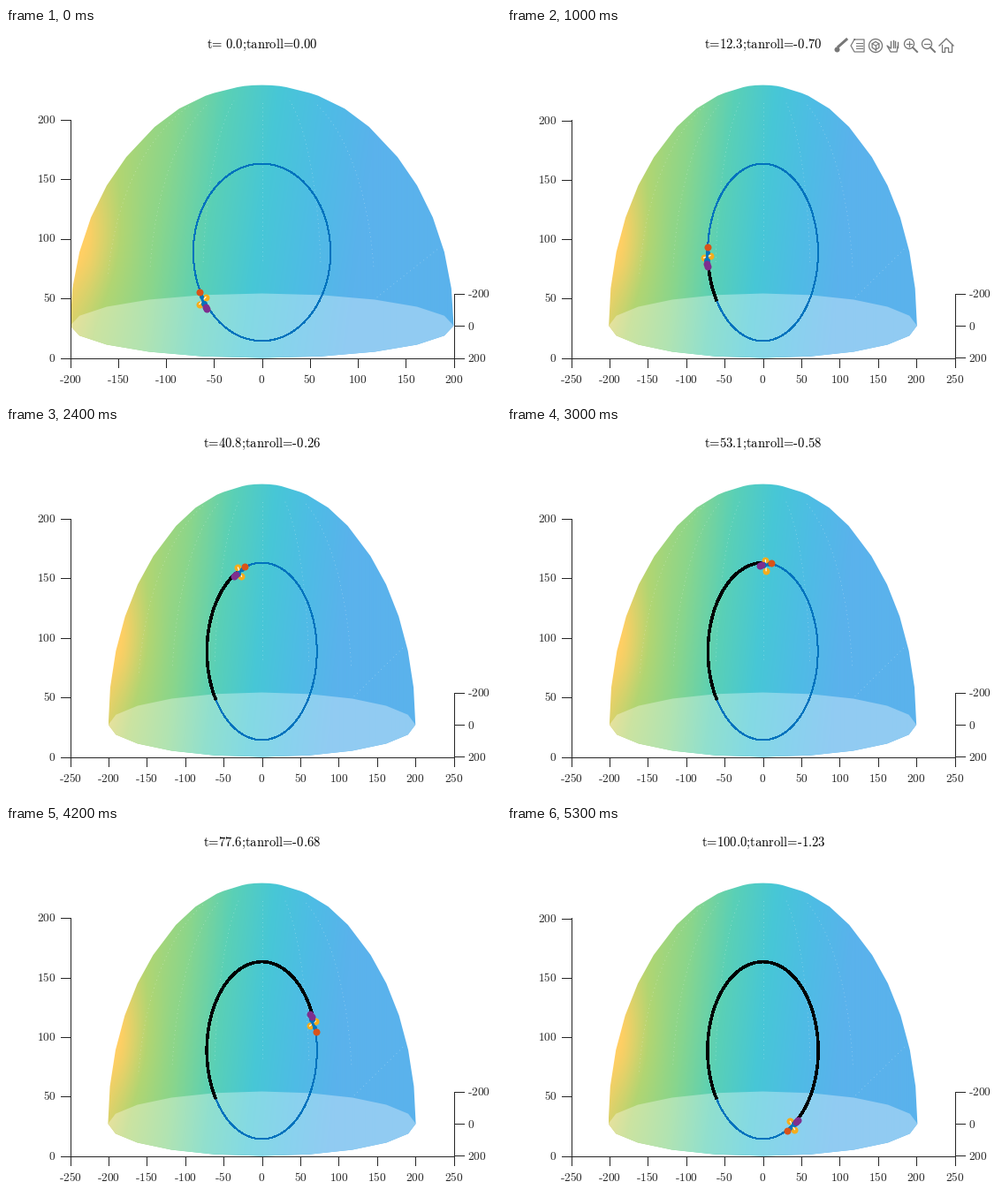
A matplotlib script for the animation above (5400 ms loop, 560 by 420 pixels).

```python
import numpy as np
import matplotlib.pyplot as plt
from matplotlib.animation import FuncAnimation
from matplotlib.colors import to_rgb
from matplotlib.path import Path

plt.rcParams["mathtext.fontset"] = "cm"
PX = 0.72                      # points per pixel at 100 dpi
STEPS, HOLD = 49, 5
CX, CY, HEIGHT, DEPTH = 289.5, 337, 270, 36.5
LEFT, RIGHT, FLOOR_Y = 72.5, 506.5, 373.5
RING_Y, RING_B, RING_A = 254, 100.3, 0.358
BLUE, ORANGE = "#0072bd", "#d95319"
YELLOW, PURPLE = "#f5ad1c", "#7e2f8e"
INK, GREY = "#262626", "#777777"

# key moments: angle on the ring and displayed roll
KEYS = np.array([0, 6, 11, 20, 31, 38, 49])
THETA = [-33, -3.5, 22.3, 65, 117.5, 161, 237]
ROLL = [0, -0.70, -0.38, -0.26, -0.81, -0.68, -1.23]


def glide(k, values):
    """Cubic Hermite curve through the key values."""
    v = np.asarray(values, float)
    m = np.gradient(v, KEYS)
    i = min(np.searchsorted(KEYS, k, side="right") - 1, len(KEYS) - 2)
    h = KEYS[i + 1] - KEYS[i]
    s = (k - KEYS[i]) / h
    return ((2*s**3 - 3*s**2 + 1) * v[i] + (s**3 - 2*s**2 + s) * h * m[i]
            + (3*s**2 - 2*s**3) * v[i + 1] + (s**3 - s**2) * h * m[i + 1])


# dome mesh: unit half sphere, 9 degree rings and 18 degree meridians
lat, az = np.meshgrid(np.radians(np.arange(0, 91, 9)),
                      np.radians(np.arange(0, 360, 18)), indexing="ij")
mesh_x = (np.cos(lat) * np.cos(az)).ravel()
mesh_y = (CY - HEIGHT * np.sin(lat) + DEPTH * np.cos(lat) * np.sin(az)).ravel()
turn = np.linspace(0, 2 * np.pi, 1440)
reach = np.outer(np.cos(turn), mesh_x * 200) + np.outer(np.sin(turn), mesh_y)
hull = reach.argmax(1)
OUTLINE = np.c_[mesh_x[hull], mesh_y[hull]]
BASE = np.c_[mesh_x[:20], mesh_y[:20]]

# shading: colour runs left to right, with a warm glow low on the left
TOP, BOTTOM = 63, 375
gx, gy = np.meshgrid(np.linspace(-1, 1, 440), np.arange(TOP, BOTTOM) + 0.5)
gz = (CY - gy) / HEIGHT
glow = 0.17 * np.exp(-((gz - 0.36) / 0.25)**2) * np.clip((-gx - 0.6) / 0.3, 0, 1)
tone = gx - 0.17 * (gz - 0.3) - glow
RAMP = np.array([to_rgb(c) for c in (
    "#ffcf64", "#b2d572", "#8cd68a", "#5ad0b6", "#47c7d6", "#4ebce5", "#5ab2ec")])
SHELL = np.dstack([np.interp(tone, np.linspace(-1.1, 0.5, len(RAMP)), channel)
                   for channel in RAMP.T])
FLOOR = 1 - (1 - SHELL) / 1.5

fig = plt.figure(figsize=(5.6, 4.2), dpi=100, facecolor="white")
ax = fig.add_axes([0, 0, 1, 1])


def line(x, y, color=INK, width=1, **kw):
    ax.plot(x, y, color=color, lw=width * PX, **kw)


def dot(p, color, size=8):
    ax.plot(*p, "o", color=color, ms=size * PX, mew=0)


def label(x, y, text, size=13.33, ha="center", color=INK):
    body = text.replace(" ", r"}\ \text{")
    ax.text(x, y, r"$\text{" + body + "}$", fontsize=size * PX, ha=ha,
            va="baseline", color=color)


def draw_dome(half):
    for texture, shape in ((SHELL, OUTLINE), (FLOOR, BASE)):
        im = ax.imshow(texture, extent=(CX - half, CX + half, BOTTOM, TOP),
                       aspect="auto", interpolation="bilinear")
        pts = shape * [half, 1] + [CX, 0]
        im.set_clip_path(Path(np.vstack([pts, pts[:1]])), transform=ax.transData)
    # faint seams
    seam = dict(color="white", width=0.8, alpha=0.4, ls=(0, (1, 5)))
    rise = np.radians(np.linspace(8, 62, 40))
    for a in np.radians(np.arange(54, 145, 18)):
        line(CX + half * np.cos(a) * np.cos(rise),
             CY - HEIGHT * np.sin(rise) - DEPTH * np.sin(a) * np.cos(rise), **seam)
    line([CX + half * 0.6, CX + half * 0.93], [305, 248], **seam)


def draw_axes(limit, r):
    line([LEFT, LEFT, RIGHT, RIGHT], [104, FLOOR_Y, FLOOR_Y, CY - DEPTH])
    for v in range(-limit, limit + 1, 50):
        x = CX + 217 * v / limit
        line([x, x], [FLOOR_Y, FLOOR_Y + 10])
        label(x, 401.5, str(v))
    for v in range(0, 201, 50):
        y = FLOOR_Y - HEIGHT * v / r
        line([LEFT - 11, LEFT], [y, y])
        label(56.5, y + 4, str(v), ha="right")
    for v in (-200, 0, 200):
        y = CY + DEPTH * v / r
        line([RIGHT, RIGHT + 11], [y, y])
        label(522.5, y + 4.5, str(v), ha="left")


def loop(x, y, r, sides=60, width=1.3):
    a = np.linspace(0, 2 * np.pi, sides + 1) + np.pi / 2
    line(x + r * np.cos(a), y + r * np.sin(a), GREY, width)


def draw_tools():
    # brush
    line([375, 384], [21, 13], GREY, 3)
    dot((373, 24), GREY, 6)
    # data tip
    line([393, 404, 404, 393, 389, 393], [13, 13, 27, 27, 20, 13], GREY, 1.2)
    for y in (17, 20, 23):
        line([395, 402], [y, y], GREY)
    # rotating cube
    loop(417, 20, 7.5)
    loop(417, 20, 4.5, sides=6)
    for a in np.radians([90, 210, 330]):
        line([417, 417 + 4.5 * np.cos(a)], [20, 20 + 4.5 * np.sin(a)], GREY)
    # hand
    for i in range(4):
        x = 434 + 2.7 * i
        line([x, x], [14 + abs(i - 1.3), 22], GREY, 1.4)
    line([434, 430, 434, 441, 442], [23, 20, 27, 27, 21], GREY, 1.3)
    # magnifiers
    for x in (455, 475):
        loop(x, 18, 5.5)
        line([x + 4, x + 9], [22, 27], GREY, 2)
        line([x - 3, x + 3], [18, 18], GREY, 1.2)
    line([455, 455], [15, 21], GREY, 1.2)
    # house
    line([489, 497, 505], [20, 12, 20], GREY, 1.4)
    for side in (-1, 1):
        line(497 + side * np.array([5.5, 5.5, 2, 2, 0]),
             [19, 27, 27, 22, 22], GREY, 1.3)


def ring(deg, a):
    t = np.radians(deg)
    return np.array([CX - a * np.cos(t), RING_Y - RING_B * np.sin(t)])


def draw_flight(theta, half):
    a = RING_A * half
    line(*ring(np.linspace(0, 360, 200), a), BLUE, antialiased=False)
    if theta > THETA[0]:
        line(*ring(np.linspace(THETA[0], theta, 150), a), "black", 2.5,
             antialiased=False, solid_capstyle="butt")

    # craft: forward and left offsets, swaying sideways around the ring
    t = np.radians(theta)
    squeeze = a / RING_B
    ahead = np.array([squeeze * np.sin(t), -np.cos(t)])
    port = np.array([-squeeze * np.cos(t), -np.sin(t)])
    sway = -0.6 - 2.8 * np.cos(t - np.radians(130))
    here = ring(theta, a)

    def part(f, side):
        return here + f * ahead + side * port

    nose, mid = part(12, 0), part(1, sway)
    left, right = part(0.5, sway + 6), part(2.2, sway - 6)
    tail, tip = part(-6.8, sway + 0.5), part(-9.8, sway - 0.5)
    dot(left, YELLOW)
    dot(right, YELLOW)
    line(*zip(left, right), "white", 1.2)
    line(*zip(nose, mid, tail), BLUE, 3)
    dot((mid + tail) / 2, BLUE, 7)
    dot((mid + nose) / 2, BLUE, 5)
    dot(nose, ORANGE)
    dot(tail, PURPLE)
    dot(tip, PURPLE)


def draw(frame):
    k = max(0, frame - HOLD + 1)
    theta = glide(k, THETA)
    # the tether starts slack and stretches most near the bottom
    r = 200.8 - 0.75 * np.sin(np.radians(theta)) if k else 200
    limit = 250 if r > 200 else 200
    half = 217 * r / limit
    ax.clear()
    draw_dome(half)
    draw_axes(limit, r)
    draw_flight(theta, half)
    if 4 <= k <= 11:
        draw_tools()
    t = 100 - 2.04 * (STEPS - k)
    label(CX + 0.3, 23, f"t={t:4.1f};tanroll={glide(k, ROLL):.2f}", 14.67,
          color="black")
    ax.set(xlim=(0, 560), ylim=(420, 0))
    ax.axis("off")


anim = FuncAnimation(fig, draw, frames=STEPS + HOLD, interval=100,
                     init_func=lambda: [], repeat=True)
plt.show()
```
